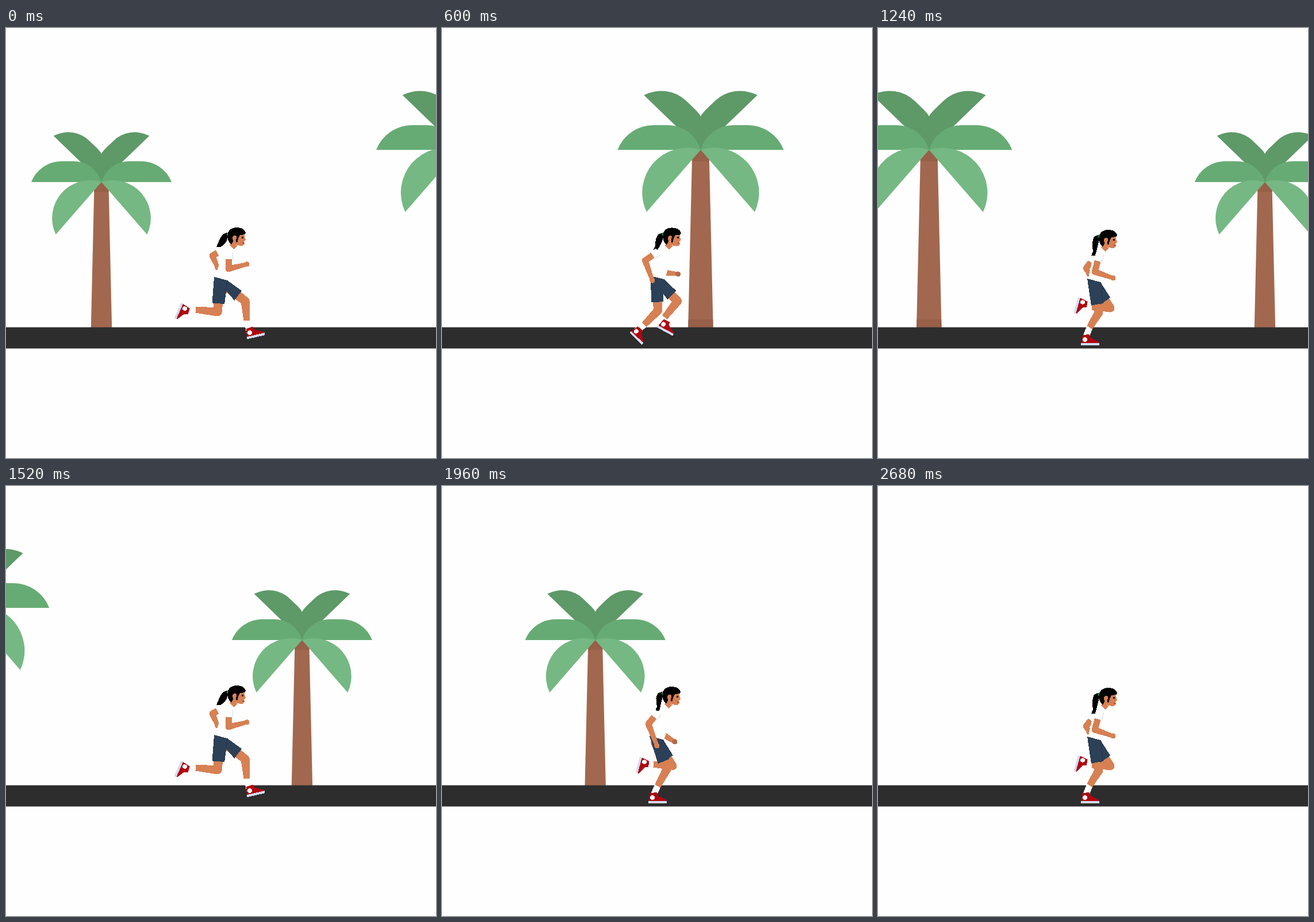
Animation of 748x748 px, one loop 2.72 s. Source, as an HTML page:

```html
<!DOCTYPE html>
<html lang="en">
<head>
<meta charset="utf-8">
<title>Runner</title>
<style>
  html, body { margin: 0; width: 100%; height: 100%; overflow: hidden; background: #fefefe; }
  svg { display: block; width: 100%; height: 100%; }
</style>
</head>
<body>
<svg viewBox="0 0 748 748">
  <defs>
    <path id="blade" d="M0 0H-144.5A67 67 0 0 1 -82 -43H-57A59 59 0 0 1 0 0Z"/>
    <use id="top" href="#blade" transform="rotate(44) scale(.95 1.02)" fill="#5e9968"/>
    <path id="low" d="M0 0A78 78 0 0 0 -94 108Z" fill="#75b883"/>
    <g id="half"><use href="#top"/></g>
    <g id="crown">
      <use href="#half"/><use href="#half" transform="scale(-1 1)"/>
      <g fill="#67ab74"><use href="#blade"/><use href="#blade" transform="scale(-1 1)"/></g>
      <use href="#low"/><use href="#low" transform="scale(-1 1)"/>
    </g>
    <g id="palm">
      <path d="M-14.6 0H14.6L22 320H-22Z" fill="#a1684f"/>
      <path d="M-14.6 0H14.6L15.1 20H-15.1Z" fill="#985f49"/>
      <use href="#crown"/>
    </g>
  </defs>
  <rect width="748" height="748" fill="#fefefe"/>
  <g id="trees"></g>
  <rect y="520.6" width="748" height="36.9" fill="#2d2d2d"/>
  <g id="runner" shape-rendering="crispEdges"></g>
</svg>
<script>
const LOOP = 2720, TICK = 40, SPEED = 0.5643;
const POSES = 9, HOLD = 170, LEAD = 60;
const SKIN = '#d68054', DARK_SKIN = '#b3694e', NAVY = '#2c4057', RED = '#b00610', LILAC = '#d3dbf5';

// arm: shoulder, elbow, hand; leg: knee, ankle, shoe, shoe angle
const reachFar = { head: [0, 0], tail: [366, 381], hip: [372, 441],
  nArm: [387, 390, 387, 419, 419, 411], nLeg: [368, 494, 330, 490, 311, 488, 114],
  fArm: [374, 388, 359, 396, 368, 417], fLeg: [416, 475, 419, 509, 424, 530, -13] };
const standFar = { head: [-2, 2], tail: [371, 391], hip: [371, 443],
  nArm: [376, 393, 359, 414, 374, 452], nLeg: [401, 487, 368, 484, 352, 480, 105],
  fArm: [388, 392, 384, 432, 405, 445], fLeg: [391, 493, 375, 522, 366, 542, 0] };
const pushFar = { head: [-1, 0], tail: [367, 385], hip: [373, 438],
  nArm: [376, 388, 352, 402, 364, 436], nLeg: [412, 472, 392, 508, 393, 524, 10],
  fArm: [388, 392, 386, 424, 412, 424], fLeg: [372, 491, 346, 515, 331, 524, 55] };
const reachNear = { head: [-2, 1], tail: [365, 381], hip: [374, 441],
  nArm: [376, 386, 351, 394, 362, 429], nLeg: [411, 486, 416, 519, 424, 538, -10],
  fArm: [390, 392, 388, 421, 413, 414], fLeg: [369, 494, 336, 486, 320, 478, 121] };
const standNear = { head: [-1, 4], tail: [371, 396], hip: [374, 444],
  nArm: [386, 392, 377, 424, 409, 435], nLeg: [384, 495, 368, 521, 360, 542, 0],
  fArm: [376, 400, 362, 418, 367, 428], fLeg: [404, 487, 372, 485, 356, 477, 106] };
const pushNear = { ...pushFar, nArm: pushFar.fArm, fArm: pushFar.nArm,
  nLeg: pushFar.fLeg, fLeg: pushFar.nLeg };
const keys = [[0, reachFar], [2 / 9, standFar], [0.36, pushFar], [5 / 9, reachNear],
  [7 / 9, standNear], [0.86, pushNear], [1, reachFar]];

function poseAt(phase) {
  let i = 0;
  while (phase >= keys[i + 1][0] - 1e-9) i++;
  const [p, a] = keys[i], [q, b] = keys[i + 1], k = (phase - p) / (q - p);
  const pose = {};
  for (const part in a) pose[part] = a[part].map((v, j) => v + (b[part][j] - v) * k);
  return pose;
}

const path = (d, fill) => `<path d="${d}" fill="${fill}"/>`;
const poly = pts => 'M' + pts.map(p => p.map(v => v.toFixed(1)).join(' ')).join('L') + 'Z';
const disc = (x, y, r, fill) => `<circle cx="${x}" cy="${y}" r="${r}" fill="${fill}"/>`;
const line = (a, b, color, w) =>
  `<path d="M${a}L${b}" stroke="${color}" stroke-width="${w}" fill="none"/>`;
const mix = (a, b, k) => [a[0] + (b[0] - a[0]) * k, a[1] + (b[1] - a[1]) * k];

// corners of a tapered bar from a to b
function bar(a, b, wa, wb) {
  const dx = b[0] - a[0], dy = b[1] - a[1], len = Math.hypot(dx, dy) || 1;
  const n = [-dy / len / 2, dx / len / 2];
  const at = (p, w) => [p[0] + n[0] * w, p[1] + n[1] * w];
  return [at(a, wa), at(b, wb), at(b, -wb), at(a, -wa)];
}

const limb = (a, b, c, [wa, wb, wc], fill) =>
  path(poly(bar(a, b, wa, wb)) + poly(bar(b, c, wb, wc)), fill) + disc(b[0], b[1], wb / 2, fill);

function arm(v, far) {
  const s = v.slice(0, 2), e = v.slice(2, 4), h = v.slice(4, 6);
  const sleeve = bar(s, mix(s, e, 0.42), 14, 14);
  return limb(s, e, h, [11, 11, 7], SKIN) +
    disc(h[0], h[1], 4.6, far && h[0] > 385 ? DARK_SKIN : SKIN) +
    path(poly(sleeve), '#fefefe') + (far ? '' : line(sleeve[2], sleeve[3], LILAC, 1));
}

function leg(hip, v) {
  const knee = v.slice(0, 2), ankle = v.slice(2, 4), [x, y, turn] = v.slice(4);
  const squash = 1 - 0.1 * Math.max(0, Math.sin(turn * Math.PI / 180));
  return line(ankle, [x, y], '#fefefe', 11) +
    limb(hip, knee, ankle, [18, 15, 11], SKIN) +
    `<g transform="translate(${x} ${y}) rotate(${turn}) scale(${squash} 1)">` +
    path('M-4 -8L8 -9L10 -3L24 4V7H-7Z', RED) +
    path('M-7 6H25V10H-7Z', LILAC) + disc(0, 0, 4, '#fefefe') + '</g>';
}

// one trouser leg, from the waistband to above the knee
function shorts([x, y], knee, near) {
  const back = [x - 10, y - 8], front = [x + 13, y - 2];
  const [, hemBack, hemFront] = bar([x, y], mix([x, y], knee, 0.72), 22, 21);
  return path(poly([back, hemBack, hemFront, front]), NAVY) +
    (near ? line(hemFront, front, '#24344c', 1) : '');
}

function shirt({ head: [dx, dy], hip: [x, y] }) {
  return path(poly([[390 + dx, 379 + dy], [378 + dx, 384 + dy], [373, 404],
    [x - 9, y - 6], [x + 14, y + 2], [394, 416], [401 + dx, 390 + dy], [401 + dx, 382 + dy]]), '#fefefe');
}

function head({ head: [dx, dy], tail }) {
  const tx = tail[0] - dx, ty = tail[1] - dy;
  return `<g transform="translate(${dx} ${dy})">` +
    path(`M385 356L378 358Q372 365 ${tx + 3} ${ty - 7}L${tx} ${ty}L${tx + 7} ${ty}Q383 376 386 364Z`, '#000') +
    path('M391 373L389 378L396 385L403 379Z', SKIN) +
    path('M392 358L416 356L415 363L417 368L414 371L415 375Q413 380 408 379L398 377L392 373Z', SKIN) +
    path('M385 362C385 351 393 347 401 347C410 347 415 350 417 356L416 359L407 360' +
      'L404 366L402 374L400 372L401 362Q397 359 394 364L395 371L392 377Q386 372 385 362Z', '#000') +
    path('M410 363H413V366H410Z', '#1c0f0c') +
    path('M411 373H414V375H411Z', '#b04a3c') +
    path('M384 357H386V361H384Z', '#1d8a35') + '</g>';
}

function figure(p) {
  return arm(p.fArm, true) + leg(p.hip, p.fLeg) + leg(p.hip, p.nLeg) + shirt(p) +
    shorts(p.hip, p.fLeg, false) + shorts(p.hip, p.nLeg, true) +
    head(p) + arm(p.nArm, false);
}

const figures = Array.from({ length: POSES }, (_, i) => figure(poseAt(i / POSES)));
const runner = document.getElementById('runner');
const trees = document.getElementById('trees');
// x at the start, crown height, scale
const palms = [[166, 268, 0.8446], [788.5, 212, 1], [1372.7, 268, 0.8446]];
trees.innerHTML = palms.map(([, , s]) => '<g><use href="#palm"/>' +
  (s === 1 ? '<path d="M-21.4 295H21.4L21.7 309H-21.7Z" fill="#985f49"/>' : '') + '</g>').join('');

let shown = -1;
function draw(ms) {
  const t = Math.floor((ms % LOOP) / TICK) * TICK;
  palms.forEach(([x, y, s], i) =>
    trees.children[i].setAttribute('transform', `translate(${(x - SPEED * t).toFixed(2)} ${y}) scale(${s})`));
  const pose = Math.floor((t + LEAD) / HOLD) % POSES;
  if (pose !== shown) runner.innerHTML = figures[shown = pose];
}

let start = null;
function frame(now) {
  if (start === null) start = now;
  draw(now - start);
  requestAnimationFrame(frame);
}
draw(0);
requestAnimationFrame(frame);
</script>
</body>
</html>
```
